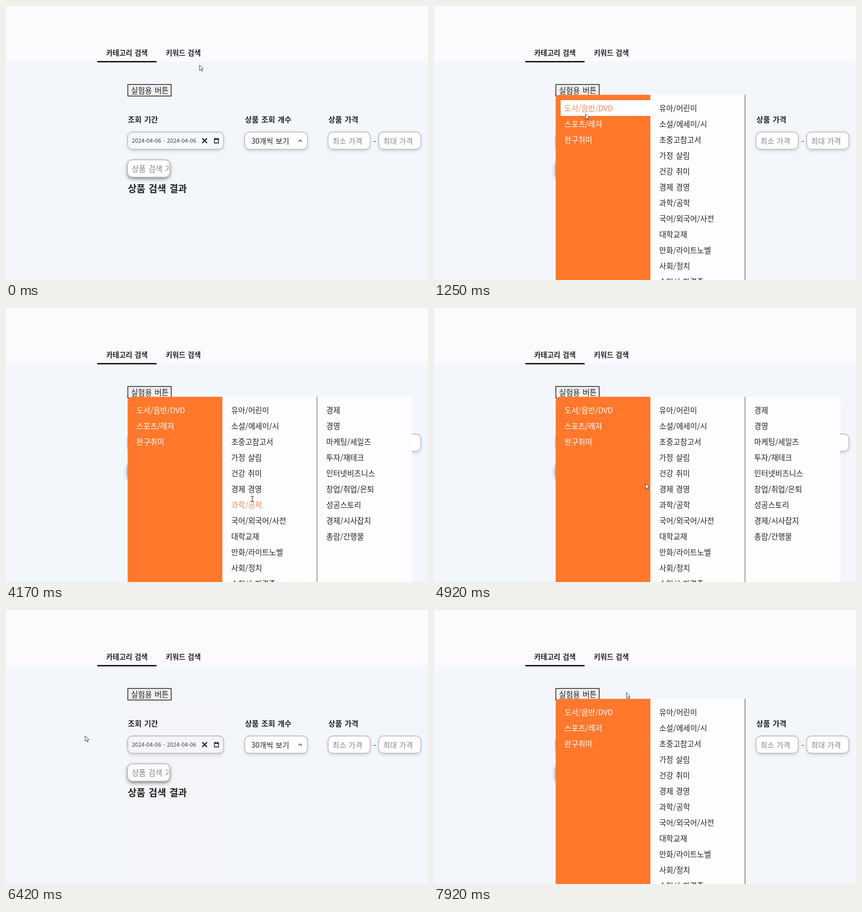
Recreate the animation shown at these times as an HTML page with a canvas. Size 800x521 px, loop 8 s.

```html
<!DOCTYPE html>
<html lang="ko">
<head>
<meta charset="utf-8">
<style>
html, body { margin: 0; width: 100%; height: 100%; overflow: hidden; }
canvas { display: block; }
</style>
</head>
<body>
<canvas id="stage" width="800" height="521"></canvas>
<script>
const ctx = document.getElementById('stage').getContext('2d');
const LOOP = 8000, STEP = 10, LAG = 40, FADE = 375;
const ORANGE = '#ff782b', PANEL = '#fdfdff', INK = '#222', HINT = '#858585';
const LEFT = 230.4, TOP = 168.6, COLUMN = 180, ROW = 30;
const words = s => s.split(',');

const mains = words('도서/음반/DVD,스포츠/레저,완구취미');
const lists = [
  '유아/어린이,소설/에세이/시,초중고참고서,가정 살림,건강 취미,경제 경영,과학/공학,국어/외국어/사전,대학교재,만화/라이트노벨,사회/정치,수험서 자격증',
  '캠핑전문관,홈트레이닝,수영/수상스포츠,골프,자전거,킥보드/스케이트,낚시,등산/아웃도어,스포츠신발,남성스포츠의류,여성스포츠의류,스포츠잡화',
  '캐릭터별완구,신생아/영아완구,로봇/작동완구,역할장난감,블록놀이,인형,물놀이/계절완구,승용완구,스포츠/야외완구,실내대형완구,STEAM완구,학습완구 교구'
].map(words);
const subLists = [
  '그림책,어린이 문학,초점책/영아책,놀이책/토이북,학습/교양,만화/애니메이션,전집/세트,어린이 잡지,유아동 해외도서,음반/DVD,누리과정 주제,그림책/사운드북',
  '한국소설,외국소설,에세이,시/희곡,장르소설,고전문학,문학이론,문학잡지',
  '초등참고서,중등참고서,고등참고서,초등/중등 자습서,수능대비,논술/면접',
  '요리,육아,인테리어,수납/정리,결혼/가족,반려동물,살림잡지',
  '건강정보,다이어트,운동/스포츠,취미/공예,여행,바둑/장기,원예',
  '경제,경영,마케팅/세일즈,투자/재테크,인터넷비즈니스,창업/취업/은퇴,성공스토리,경제/시사잡지,총람/간행물',
  '교양과학,수학,물리학,화학,생명과학,지구과학,공학,과학잡지'
].map(words);

// Where the pointer turns: time, x, y
const turns = [
  [0, 367, 112], [400, 310, 160], [830, 290, 176], [1250, 287, 205], [1620, 440, 197],
  [2300, 640, 196], [2830, 656, 195], [3300, 480, 197], [3580, 470, 225], [3750, 470, 225],
  [4170, 467, 363], [4650, 460, 374], [5400, 297, 262], [5580, 297, 254], [6000, 245, 230],
  [6250, 150, 239], [6450, 150, 239], [6700, 260, 165], [6900, 643, 160], [7200, 420, 168],
  [7400, 350, 190], [LOOP, 367, 152]
];

function pointerAt(t) {
  const i = Math.max(1, turns.findIndex(p => p[0] >= t));
  const [t0, x0, y0] = turns[i - 1], [t1, x1, y1] = turns[i];
  const k = (t - t0) / (t1 - t0);
  return { x: x0 + (x1 - x0) * k, y: y0 + (y1 - y0) * k };
}

const columnsOf = ({ main, sub }) => [mains, lists[main], subLists[sub]].filter(Boolean);
const cellAt = ({ x, y }) => [Math.floor((x - 230) / COLUMN), Math.floor((y - 180) / ROW)];

// Replays the hovering since the loop began, so the menu depends on time alone.
function menuAt(t) {
  const menu = { fade: 0, main: -1, sub: -1 };
  for (let time = 0; time <= t - LAG; time += STEP) {
    const p = pointerAt(time);
    const [column, row] = cellAt(p);
    const onStrip = p.x > 230 && p.y > 149 && p.y < 172;
    const onMenu = menu.fade > 0 && p.y > TOP && column >= 0 && column < columnsOf(menu).length;
    menu.fade += (onStrip || onMenu ? STEP : -STEP) / FADE;
    menu.fade = Math.min(1, Math.max(0, menu.fade));
    if (!menu.fade) menu.main = menu.sub = -1;
    if (!onMenu) continue;
    if (column === 0 && mains[row]) {
      menu.main = row;
      menu.sub = -1;
    }
    if (column === 1 && row >= 0) menu.sub = row;
  }
  return menu;
}

function text(s, x, y, size = 14.4, color = INK, weight = 350) {
  ctx.font = `${weight} ${size}px "Noto Sans CJK KR", "Noto Sans CJK", sans-serif`;
  ctx.wordSpacing = size * 0.12 + 'px';
  ctx.fillStyle = color;
  ctx.fillText(s, x, y);
}
const bold = (s, x, y, size) => text(s, x, y, size, INK, 700);

function rect(x, y, w, h, color) {
  ctx.fillStyle = color;
  ctx.fillRect(x, y, w, h);
}
function stroke(path, width, color) {
  ctx.lineWidth = width;
  ctx.strokeStyle = color;
  ctx.stroke(new Path2D(path));
}
function field(x, y, w, fill = '#fefefe', shadow = 0.14) {
  ctx.beginPath();
  ctx.roundRect(x + .5, y + .5, w - 1, 33, 9);
  ctx.save();
  ctx.shadowColor = `rgba(0,0,0,${shadow})`;
  ctx.shadowBlur = 7;
  ctx.shadowOffsetY = 3;
  ctx.fillStyle = fill;
  ctx.fill();
  ctx.restore();
  ctx.lineWidth = 1.3;
  ctx.strokeStyle = '#b4b4b6';
  ctx.stroke();
}

function drawPage() {
  rect(0, 0, 800, 521, '#f3f7fc');
  rect(0, 0, 800, 105, '#fcfafd');
  bold('카테고리 검색', 190, 94, 13.4);
  bold('키워드 검색', 303, 94, 13.4);
  rect(173, 104.7, 112.5, 2.4, '#000');

  rect(230.3, 148.6, 83.5, 23.3, '#111');
  rect(231.6, 149.9, 80.9, 20.7, '#efefef');
  text('실험용 버튼', 237, 165.5);

  bold('조회 기간', 231, 220.5, 14.2);
  bold('상품 조회 개수', 453, 220.5, 14.2);
  bold('상품 가격', 611, 220.5, 14.2);
  bold('상품 검색 결과', 231, 353.5, 18);

  field(230, 239, 183, '#f4f7fb');
  text('2024-04-06 - 2024-04-06', 238.5, 260, 10.8, '#444');
  stroke('M372 251.5l9 9m0-9l-9 9', 2, '#111');
  stroke('M395.2 252.7h7.6v7.8h-7.6z', 1.3, '#111');
  stroke('M394.6 253.3h8.8M396.7 250.8v2m4.6-2v2', 1.8, '#111');

  field(452, 239, 120);
  text('30개씩 보기', 465, 262, 14);
  stroke('M554.5 258l3.3-3.3l3.3 3.3', 1.3, '#444');

  field(610, 239, 81);
  text('최소 가격', 619, 261.5, 14, HINT);
  text('-', 696.5, 262);
  field(706, 239, 81);
  text('최대 가격', 715, 261.5, 14, HINT);

  field(230, 292, 81, '#fefefe', 0.5);
  ctx.save();
  ctx.beginPath();
  ctx.rect(238, 293, 70, 32);
  ctx.clip();
  text('상품 검색 기', 238.5, 314.5, 14.4, HINT);
  ctx.restore();
}

// Returns whether the pointer is over a label.
function drawMenu(menu, pointer) {
  const [hoverColumn, hoverRow] = cellAt(pointer);
  let overText = false;
  ctx.save();
  ctx.globalAlpha = menu.fade ** 2 * (3 - 2 * menu.fade);
  ctx.beginPath();
  ctx.roundRect(LEFT, TOP, 3 * COLUMN - .4, 400, 9);
  ctx.clip();
  columnsOf(menu).forEach((items, c) => {
    const left = LEFT + c * COLUMN, x = 247 + c * COLUMN;
    rect(left, TOP, COLUMN, 400, c ? PANEL : ORANGE);
    if (c === 1) rect(589, TOP, 1.3, 400, '#666');
    items.forEach((label, r) => {
      const middle = 195 + r * ROW;
      const hovered = c === hoverColumn && r === hoverRow;
      if (hovered && !c) rect(240, middle - 16, COLUMN, ROW, PANEL);
      text(label, x, middle + 5.3, 14.4, hovered ? '#f48a4c' : c ? INK : '#fff');
      const dx = pointer.x - x, dy = pointer.y - middle;
      overText ||= dx > 0 && dx < ctx.measureText(label).width && dy > -13 && dy < 9;
    });
  });
  ctx.restore();
  return overText && menu.fade > 0.5;
}

function drawPointer({ x, y }, beam) {
  ctx.save();
  ctx.translate(x, y);
  if (beam) {
    stroke('M-3-5L0-4.5L3-5M0-4.5v9M-3 5L0 4.5L3 5', 1.1, '#333');
  } else {
    const arrow = 'M0 0v10.5l2.5-2.2l1.7 3.7l1.6-.7l-1.6-3.6l3-.4z';
    ctx.fillStyle = '#fff';
    ctx.fill(new Path2D(arrow));
    stroke(arrow, 0.9, '#333');
  }
  ctx.restore();
}

function frame() {
  const t = performance.now() % LOOP;
  const pointer = pointerAt(t), menu = menuAt(t);
  drawPage();
  drawPointer(pointer, menu.fade > 0 && drawMenu(menu, pointer));
  requestAnimationFrame(frame);
}
frame();
</script>
</body>
</html>
```
